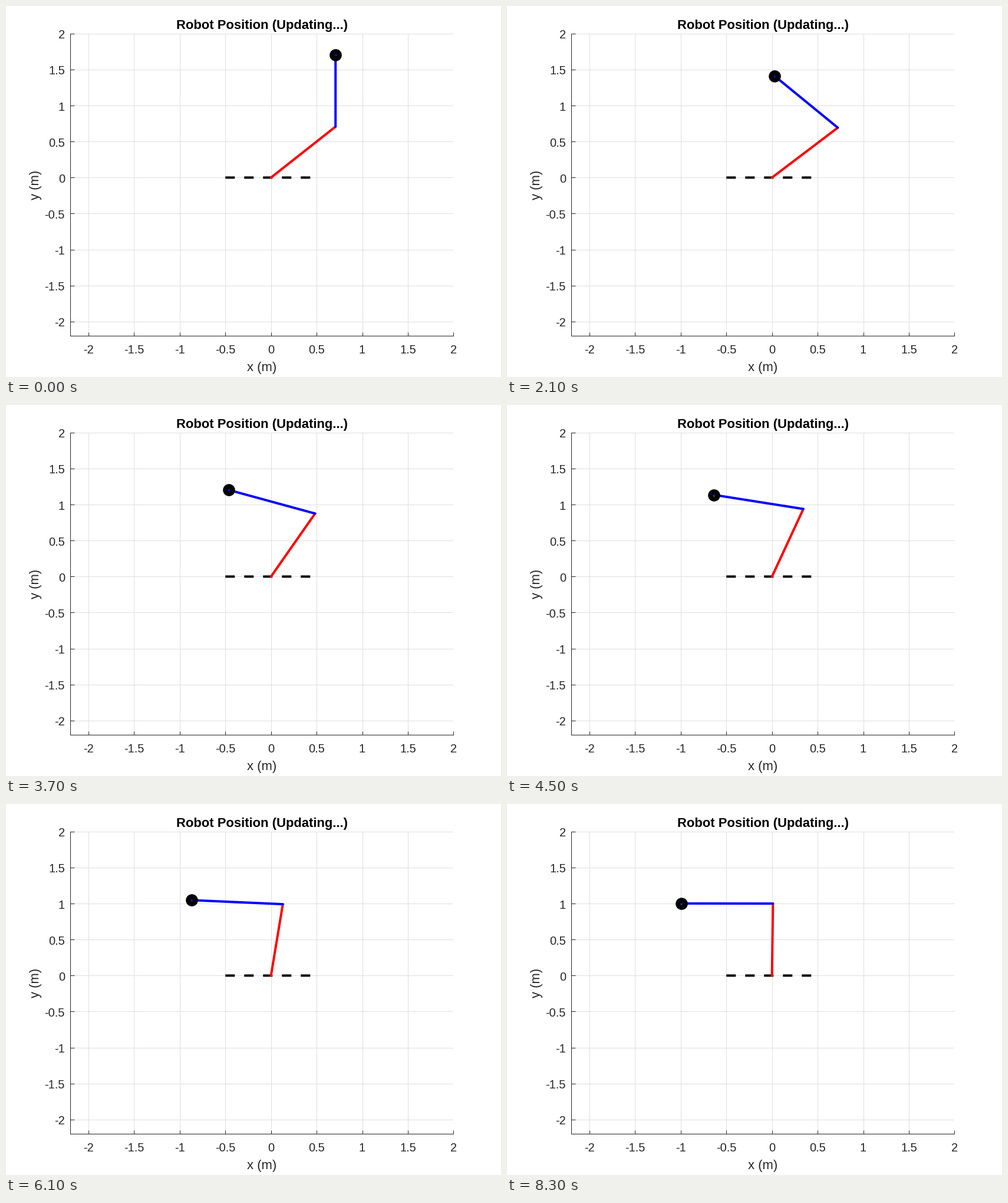
A matplotlib script for the animation above (8.35 s loop, 840x630 px).

```python
import numpy as np
import matplotlib.pyplot as plt
from matplotlib.animation import FuncAnimation

W, H, DPI = 840, 630, 100
PX = 72 / DPI  # points per pixel
LEFT, TOP, WIDE, HIGH = 109, 46.85, 650.4, 513.45  # plot area in pixels
LOW, TOTAL = -2.2, 4.2                             # data range of both axes
STEP = 0.05    # seconds per frame
HOLD = 6       # frames of rest before the arm moves
FRAMES = 167
INK = "#262626"

plt.rcParams["font.family"] = "Liberation Sans"

# Absolute link angles in degrees at a few moments (seconds).
TIMES = np.array([0, 0.5, 0.85, 1.15, 1.7, 2.55, 3.4, 4.25, 5, 5.95, 6.8, 8])
LOWER = np.array([45, 43.1, 40.9, 40, 43.1, 51.3, 61.1, 70.4, 77, 83.4, 87.1, 89.4])
UPPER = np.array([90, 98.8, 110.2, 119, 131.8, 148.5, 160.9, 169.1, 173.8, 177.2, 179, 179.9])


def smooth(t, values):
    """Cubic Hermite curve through the values, starting from rest."""
    slopes = np.gradient(values, TIMES)
    slopes[0] = 0
    i = min(np.searchsorted(TIMES, t, side="right") - 1, len(TIMES) - 2)
    h = TIMES[i + 1] - TIMES[i]
    s = (t - TIMES[i]) / h
    return ((1 + 2 * s) * (1 - s) ** 2 * values[i]
            + s * (1 - s) ** 2 * h * slopes[i]
            + s * s * (3 - 2 * s) * values[i + 1]
            + s * s * (s - 1) * h * slopes[i + 1])


def label(x, y, text, size, ha="center", color=INK, **style):
    """Text with its baseline at a pixel position counted from the top left."""
    fig.text(x / W, 1 - y / H, text, fontsize=size * PX, ha=ha,
             va="baseline", color=color, **style)


fig = plt.figure(figsize=(W / DPI, H / DPI), dpi=DPI, facecolor="white")
ax = fig.add_axes([LEFT / W, 1 - (TOP + HIGH) / H, WIDE / W, HIGH / H])
ax.set(xlim=(LOW, LOW + TOTAL), ylim=(LOW, LOW + TOTAL))
ax.set_axisbelow(True)
ticks = np.arange(-2, 2.1, 0.5)
ax.set_xticks(ticks)
ax.set_yticks(ticks)
ax.grid(color="#dfdfdf", lw=PX)
ax.tick_params(direction="in", length=6.5 * PX, width=PX, color=INK,
               labelbottom=False, labelleft=False)
for side in ("top", "right"):
    ax.spines[side].set_visible(False)
for side in ("bottom", "left"):
    ax.spines[side].set(color=INK, linewidth=PX)

middle = LEFT + WIDE / 2
for v in ticks:
    part = (v - LOW) / TOTAL
    label(LEFT + WIDE * part, 590, f"{v:g}", 20)
    label(100, TOP + HIGH * (1 - part) + 8.5, f"{v:g}", 20, ha="right")
label(middle, 39.3, "Robot Position (Updating...)", 22, color="black", weight="bold")
label(middle, 620.3, "x (m)", 22)
label(56, 304, "y (m)", 22, rotation=90, rotation_mode="anchor")

ax.plot([-0.5, 0.5], [0, 0], color="black", lw=4 * PX, ls=(0, (4, 4)),
        dash_capstyle="butt", snap=False)
link = dict(lw=4 * PX, solid_capstyle="round", snap=False)
lower, = ax.plot([], [], color="red", **link)
upper, = ax.plot([], [], color="blue", **link)
tip, = ax.plot([], [], "o", ms=12.3 * PX, mew=8.3 * PX, mfc="none", mec="black")


def update(n):
    t = max(0, n - HOLD) * STEP
    a, b = np.radians([smooth(t, LOWER), smooth(t, UPPER)])
    ex, ey = np.cos(a), np.sin(a)
    x, y = ex + np.cos(b), ey + np.sin(b)
    lower.set_data([0, ex], [0, ey])
    upper.set_data([ex, x], [ey, y])
    tip.set_data([x], [y])
    return lower, upper, tip


anim = FuncAnimation(fig, update, frames=FRAMES, interval=50, repeat=True,
                     repeat_delay=0, init_func=lambda: update(0))
plt.show()
```
